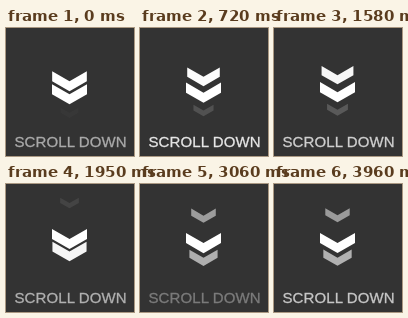
An HTML page that plays this animation: 128x128 px, repeating every 4060 ms.

```html
<!DOCTYPE html>
<html lang="en">
<head>
<meta charset="utf-8">
<title>Scroll down</title>
<style>
  html, body { margin: 0; width: 100%; height: 100%; overflow: hidden; background: #333; }
  svg { position: absolute; left: 0; top: 0; }
  p {
    position: absolute; left: 8.5px; top: 105px; margin: 0;
    font: 15px/17px Arial, "Liberation Sans", sans-serif;
    letter-spacing: 0.1px; -webkit-text-stroke: 0.3px #fff;
    color: #fff; white-space: nowrap;
  }
</style>
</head>
<body>
<svg width="128" height="128" fill="#fff">
  <defs><path id="chevron" d="M-17.5-10.05L0 0 17.5-10.05V0L0 10.05-17.5 0Z"/></defs>
  <use href="#chevron"/><use href="#chevron"/><use href="#chevron"/>
</svg>
<p>SCROLL DOWN</p>
<script>
const LOOP = 4060, LAST = 3960;   // the final pose is held until the loop restarts
const BEAT = 905, START = 105;    // a new chevron appears on every beat
const chevrons = document.querySelectorAll('use');
const label = document.querySelector('p');

const mod = (a, n) => (a % n + n) % n;
const mix = (a, b, k) => a + (b - a) * k;

// cubic-bezier(0, 0, .58, 1)
function easeOut(x) {
  x = Math.min(1, Math.max(0, x));
  let lo = 0, hi = 1;
  for (let i = 0; i < 20; i++) {
    const s = (lo + hi) / 2;
    if (1.74 * s * s - 0.74 * s ** 3 < x) lo = s; else hi = s;
  }
  return lo * lo * (3 - 2 * lo);
}

// age runs from 0 to 3 beats: drop in, drift, drop out
function pose(age) {
  if (age < 0.99) {
    const k = easeOut(age / 0.99);
    return { y: 37.5 * k, scale: mix(0.5, 1, k), opacity: easeOut(age / 0.75) };
  }
  if (age < 2.01) return { y: mix(37.5, 50, easeOut((age - 0.99) / 1.02)), scale: 1, opacity: 1 };
  const k = easeOut((age - 2.01) / 0.99);
  return { y: mix(50, 68.75, k), scale: mix(1, 0.5, k), opacity: 1 - k };
}

function draw(now) {
  const beat = (Math.min(now % LOOP, LAST) - START) / BEAT;
  chevrons.forEach((chevron, i) => {
    const { y, scale, opacity } = pose(mod(beat + i, 3));
    chevron.setAttribute('transform', `translate(63.5 ${16.5 + y}) scale(${scale})`);
    chevron.setAttribute('opacity', opacity);
  });
  label.style.opacity = 1 - 0.375 * Math.abs(mod(beat + 1, 4) - 2);
}

const begin = performance.now();
function tick() {
  draw(performance.now() - begin);
  requestAnimationFrame(tick);
}
tick();
</script>
</body>
</html>
```
